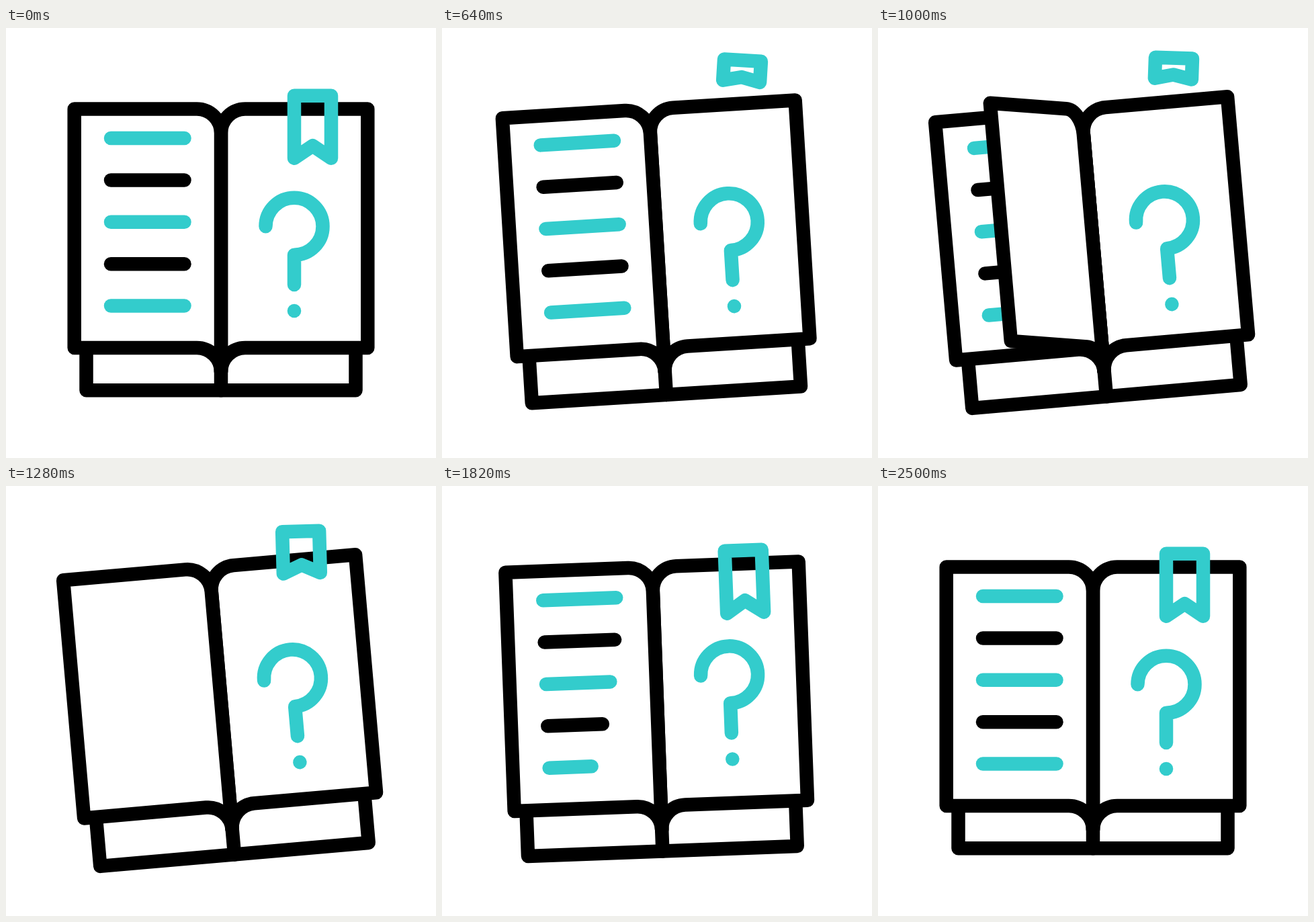
An HTML page with a canvas that plays this animation: 640x640 px, repeating every 3020 ms.

```html
<!DOCTYPE html>
<html lang="en">
<head>
<meta charset="utf-8">
<title>Book</title>
<style>
  html, body { margin: 0; height: 100%; overflow: hidden; background: #fff; }
  canvas { display: block; width: 100vw; height: 100vh; }
</style>
</head>
<body>
<canvas id="stage" width="640" height="640"></canvas>
<script>
const ctx = document.getElementById('stage').getContext('2d');
const LOOP = 3020, BLACK = '#000', TEAL = '#3cc';
const PAGE_WIDTH = 218.3, TOP = 120.5, BOTTOM = 476, RADIUS = 36, LIFT = 27;

const progress = (t, from, to) => Math.min(1, Math.max(0, (t - from) / (to - from)));
const smooth = u => u * u * (3 - 2 * u);

// cubic-bezier(.4, 0, .35, 1), solved by bisection
function ease(x) {
  let lo = 0, hi = 1;
  for (let i = 0; i < 20; i++) {
    const s = (lo + hi) / 2, r = 1 - s;
    if (1.2 * s * r * r + 1.05 * s * s * r + s * s * s < x) lo = s; else hi = s;
  }
  return smooth(lo);
}
const outAndBack = (t, a, b, c, d) => ease(progress(t, a, b)) - ease(progress(t, c, d));

function stroke(color, points, close) {
  ctx.beginPath();
  points.forEach(p => ctx.lineTo(...p));
  if (close) ctx.closePath();
  ctx.strokeStyle = color;
  ctx.stroke();
}

// turn: 1 lies flat on the right, -1 flat on the left
function drawPage(turn) {
  const lift = LIFT * Math.sqrt(Math.max(0, 1 - turn * turn));
  const hinge = RADIUS * (1 + turn) / 2;
  const shear = lift / (PAGE_WIDTH - hinge);
  ctx.save();
  ctx.transform(turn, -shear, 0, 1, 320, shear * hinge);
  ctx.beginPath();
  ctx.moveTo(0, TOP + RADIUS);
  ctx.arc(RADIUS, TOP + RADIUS, RADIUS, Math.PI, 1.5 * Math.PI);
  ctx.lineTo(PAGE_WIDTH, TOP);
  ctx.lineTo(PAGE_WIDTH, BOTTOM);
  ctx.lineTo(RADIUS, BOTTOM);
  ctx.arc(RADIUS, BOTTOM + RADIUS, RADIUS, 1.5 * Math.PI, Math.PI, true);
  ctx.closePath();
  ctx.restore();
  ctx.fillStyle = '#fff';
  ctx.fill();
  ctx.strokeStyle = BLACK;
  ctx.stroke();
}

function drawLines(t, flipped) {
  for (let i = 0; i < 5; i++) {
    const start = 1400 + 66 * i;
    const u = flipped ? progress(t, start, start + 450) : 1;
    const y = 164 + 62.4 * i;
    if (u > 0) stroke(i % 2 ? BLACK : TEAL, [[156, y], [156 + 109.5 * (1 - (1 - u) ** 2), y]]);
  }
}

function drawQuestion(squeeze, rise) {
  const x = 333 + 96 * squeeze;
  ctx.beginPath();
  ctx.ellipse(x, 295.3 - rise, 42.5 * squeeze, 42.5, 0, Math.PI, 2.5 * Math.PI);
  ctx.lineTo(x, 382 - rise);
  ctx.strokeStyle = TEAL;
  ctx.stroke();
  ctx.beginPath();
  ctx.arc(x, 421 - rise, 10.3, 0, 2 * Math.PI);
  ctx.fillStyle = TEAL;
  ctx.fill();
}

function drawBookmark(p) {
  const height = 1 - p * 2 / 3;
  ctx.save();
  ctx.translate(456.5 + 7.5 * p, 100.7 - 44.5 * p);
  ctx.rotate(7 * p * Math.PI / 180);
  stroke(TEAL, [[-27.5, 0], [27.5, 0], [27.5, 93 * height], [0, 74.5 * height], [-27.5, 93 * height]], true);
  ctx.restore();
}

function draw(t) {
  const tilt = outAndBack(t, 300, 960, 1425, 2323);
  const turn = 1 - 2 * smooth(progress(t, 655, 1136));
  const flipped = turn <= -1;
  const hop = 24 * Math.sin(Math.PI * progress(t, 1620, 2500)) ** 2;
  const floor = 539.3 + 10 * tilt;

  ctx.setTransform(1, 0, 0, 1, 0, 0);
  ctx.fillStyle = '#fff';
  ctx.fillRect(0, 0, 640, 640);
  ctx.lineWidth = 20.5;
  ctx.lineCap = ctx.lineJoin = 'round';
  ctx.translate(320, 320);
  ctx.rotate(-5 * tilt * Math.PI / 180);
  ctx.translate(-320, -320);

  stroke(BLACK, [[119.5, BOTTOM], [119.5, floor], [520.5, floor], [520.5, BOTTOM]]);
  stroke(BLACK, [[320, 500], [320, floor]]);
  drawPage(1);
  drawPage(-1);
  if (!flipped) drawLines(t, false);
  if (turn < 1 && !flipped) drawPage(turn);
  if (flipped) drawLines(t, true);
  drawQuestion(turn > 0 ? turn : 1, hop);
  drawBookmark(outAndBack(t, 20, 690, 1060, 1600));
}

const begin = performance.now();
function tick() {
  draw((performance.now() - begin) % LOOP);
  requestAnimationFrame(tick);
}
tick();
</script>
</body>
</html>
```
